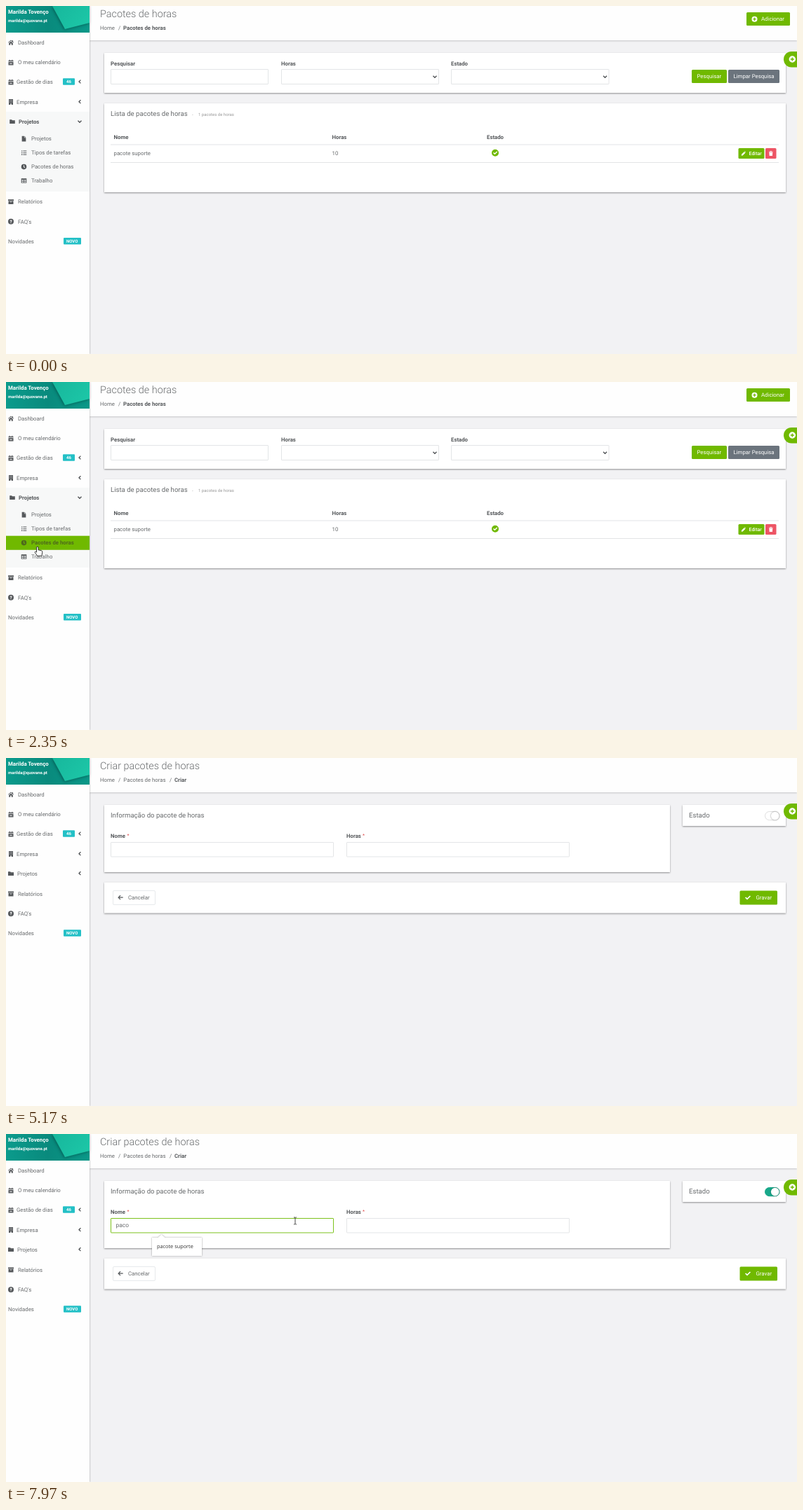
Recreate the animation shown at these times as an HTML page. Size 1127 by 497 pixels, loop 8000 ms.

```html
<!DOCTYPE html>
<html lang="pt">
<head>
<meta charset="utf-8">
<title>Pacotes de horas</title>
<style>
html, body { margin: 0; width: 100%; height: 100%; overflow: hidden; background: #f2f2f4; }
svg { display: block; width: 1127px; height: 497px; }
text { font-family: Roboto, sans-serif; text-rendering: geometricPrecision; white-space: pre; }
.b { font-weight: 700; }
.l { font-weight: 300; }
.m { font-weight: 500; }
.seg { font-family: "Open Sans", sans-serif; }
.card { fill: #fff; filter: drop-shadow(0 1px 1px rgba(0,0,0,.42)); }
.field { fill: #fff; stroke: #e3e5e7; stroke-width: 1; }
.field.focus { stroke: #7cc21c; }
.row .bg { fill: none; }
.row.on .bg { fill: #70b900; }
.row.on text { font-weight: 700; fill: #4f6a1c; }
.row.on .ico { fill: #4f6a1c; }
.row.on .line { stroke: #4f6a1c; }
.line { fill: none; stroke: #4c4f52; stroke-width: 1.3; }
</style>
</head>
<body>
<svg id="stage" viewBox="0 0 1127 497" xmlns="http://www.w3.org/2000/svg"></svg>
<script>
const GREEN = '#70b900', GREY = '#676a6c', DARK = '#55585b', TEAL = '#23c0c6';
const DISC = 'M4 0a4 4 0 1 0 0 8a4 4 0 1 0 0-8z';
const TICK = 'M1.6 4.2l.8-.8 1.1 1.1 2.3-2.3.8.8-3.1 3.1z';

// Icons live in an 8 by 8 box.
const ICONS = {
  home: 'M0 4L4 .4 5.9 2.1V.9H7v2.2l1 .9-.6.6L4 1.6.6 4.6zM1.2 4.9L4 2.4l2.8 2.5v2.8H4.8V5.4H3.2v2.3H1.2z',
  calendar: 'M.5 1.1h1.2V0h1.1v1.1h2.4V0h1.1v1.1h1.2v1.5h-7zM.5 3.2h7v4.6h-7zM2.3 5.1v.9h3.4v-.9z',
  building: 'M1 0h6v8H4.7V6.2H3.3V8H1zM2.3 1.2v1h1v-1zM4.7 1.2v1h1v-1zM2.3 3.6v1h1v-1zM4.7 3.6v1h1v-1z',
  folder: 'M0 1.2h3l1 1h4v4.9H0z',
  file: 'M1 0h3.4v2.6H7V8H1zM5 0l2 2H5z',
  list: 'M2.8.8H8v1.1H2.8zM2.8 3.5H8v1.1H2.8zM2.8 6.2H8v1.1H2.8zM.3.7h1.4v1.4H.3zM.3 3.4h1.4v1.4H.3zM.3 6.1h1.4v1.4H.3z',
  clock: DISC + 'M3.5 1.6h1v2.3l1.4 1-.6.8-1.8-1.3z',
  table: 'M0 .6h8v6.8H0zM1 2.7v1.4h2.5V2.7zM4.5 2.7v1.4H7V2.7zM1 5.1v1.3h2.5V5.1zM4.5 5.1v1.3H7V5.1z',
  archive: 'M0 .6h8v2H0zM.5 3.1h7v4.3h-7zM3 3.8v.7h2v-.7z',
  help: DISC + 'M2.6 3.1Q2.6 1.6 4 1.6 5.5 1.6 5.5 2.9 5.5 3.8 4.5 4.3V4.9H3.5V3.9Q4.5 3.4 4.5 2.9 4.5 2.5 4 2.5 3.6 2.5 3.6 3.1zM3.5 5.4h1v1h-1z',
  plus: DISC + 'M3.4 1.8v1.6H1.8v1.2h1.6v1.6h1.2V4.6h1.6V3.4H4.6V1.8z',
  done: DISC + TICK,
  check: 'M0 4.3l1.2-1.2 1.8 1.8L6.8 1.1 8 2.3 3 7.3z',
  back: 'M0 4l3.6-3.6.9.9-2 2H8v1.4H2.5l2 2-.9.9z',
  pencil: 'M0 8l.4-2.4L4.9 1.1l2 2L2.4 7.6zM5.4.6L6 0l2 2-.6.6z',
  trash: 'M.6.7h2L3 0h2l.4.7h2v1H.6zM1.1 2.2h5.8L6.5 8h-5z'
};

const text = (s, x, y, o = {}) => {
  const { size = 7.8, fill = GREY, cls = '', id = '' } = o;
  return `<text id="${id}" class="${cls}" x="${x}" y="${y + size * .355}" font-size="${size}" fill="${fill}">${s}</text>`;
};
const bold = (s, x, y, o) => text(s, x, y, { fill: DARK, cls: 'b', ...o });
const box = (x, y, x2, y2, fill, r = 1.5, extra = '') =>
  `<rect x="${x}" y="${y}" width="${x2 - x}" height="${y2 - y}" rx="${r}" fill="${fill}" ${extra}/>`;
const card = (x, y, x2, y2) => box(x, y, x2, y2, '#fff', .5, 'class="card"');
const field = (x, y, x2, y2, id = '') =>
  box(x + .5, y + .5, x2 - .5, y2 - .5, '#fff', .5, `class="field" id="${id}"`);
const icon = (name, cx, cy, size = 8, fill = DARK) =>
  `<path class="ico" fill="${fill}" fill-rule="evenodd" d="${ICONS[name]}" transform="translate(${cx - size / 2} ${cy - size / 2}) scale(${size / 8})"/>`;
const line = (d, extra = '') => `<path class="line" d="${d}" ${extra}/>`;
const rule = y => `<path d="M149 ${y}H1101" stroke="#e2e4e6"/>`;
const left = y => line(`M106.4 ${y - 2.4}l-2.4 2.4 2.4 2.4`);
const down = (x, y) => line(`M${x - 2.5} ${y - 1.2}l2.5 2.5 2.5-2.5`);
const badge = (s, x, x2, y, tx) => box(x, y - 4.7, x2, y + 4.7, TEAL, 1) + bold(s, tx, y, { size: 6, fill: '#fff' });
const item = (name, s, x, y) => icon(name, 7, y, 8) + text(s, x, y);
const button = (x, y, x2, y2, fill, s, tx, id = '') =>
  box(x, y, x2, y2, fill, 1.5, `id="${id}"`) + text(s, tx, (y + y2) / 2, { fill: '#fff' });
const tail = (a, b, c) =>
  item('archive', 'Relatórios', 17, a) + item('help', "FAQ's", 17, b) +
  text('Novidades', 3, c) + badge('NOVO', 82, 107, c - .5, 86);

const rows = [
  { y: 151, y2: 179.5, c: 165, s: 'Projetos', ic: 'folder', x: 18, ix: 9, head: true },
  ...[['file', 'Projetos'], ['list', 'Tipos de tarefas'], ['clock', 'Pacotes de horas'], ['table', 'Trabalho']]
    .map(([ic, s], i) => ({ y: 179.5 + 20.1 * i, y2: 199.6 + 20.1 * i, c: 189.6 + 20 * i, s, ic, x: 36, ix: 25.5 }))
];
const row = r => `<g class="row">${box(0, r.y, 119, r.y2, '', 0, 'class="bg"')}
  ${icon(r.ic, r.ix, r.c, 7.6)}${r.head ? bold(r.s, r.x, r.c) + down(105, r.c) : text(r.s, r.x, r.c)}</g>`;

const sidebar = `
  ${box(0, 0, 119, 497, '#fefefe', 0, 'style="filter:drop-shadow(0 0 1.2px rgba(0,0,0,.4))"')}
  <linearGradient id="deep"><stop stop-color="#0b9b8c"/><stop offset=".5" stop-color="#098a7d"/><stop offset="1" stop-color="#0a9888"/></linearGradient>
  <linearGradient id="mint" x2="1" y2=".5"><stop stop-color="#17b79c"/><stop offset="1" stop-color="#1cc5a6"/></linearGradient>
  ${box(0, 0, 119, 38, 'url(#deep)', 0)}
  <path d="M66 0L84 33 119 24V0z" fill="url(#mint)" style="filter:drop-shadow(-1px 1px 2px rgba(0,50,45,.5))"/>
  ${box(119, 0, 120, 40, '#dcdfe0', 0)}
  ${bold('Marilda Tovenço', 3, 8, { fill: '#fff' })}
  ${bold('marilda@quovane.pt', 3, 20.5, { fill: '#fff', size: 6 })}
  ${item('home', 'Dashboard', 17, 52)}
  ${item('calendar', 'O meu calendário', 17, 80.7)}
  ${item('calendar', 'Gestão de dias', 15, 108.7)}${badge('46', 81, 98, 108, 86)}${left(108)}
  ${item('building', 'Empresa', 15, 137)}${left(136.7)}`;

const listPage = `
  ${box(0, 151, 119, 265, '#f7f8f8', 0)}
  ${rows.map(row).join('')}
  ${tail(279.7, 307.8, 336.3)}
  ${text('Pacotes de horas', 134, 11, { size: 14.4, cls: 'l' })}
  ${text('Home', 134, 31)}${text('/', 160, 31)}${bold('Pacotes de horas', 167, 31)}
  ${button(1055, 9, 1117, 28, GREEN, 'Adicionar', 1076, 'add')}${icon('plus', 1066.5, 18.7, 8, '#fff')}
  ${card(140, 67, 1111, 124)}
  ${bold('Pesquisar', 149, 82)}${bold('Horas', 392, 82)}${bold('Estado', 634, 82)}
  ${field(149, 90, 374, 112)}${field(392, 90, 617, 112)}${field(634, 90, 859.5, 112)}
  ${down(611, 101)}${down(853.5, 101)}
  ${button(977, 91, 1027, 110, GREEN, 'Pesquisar', 984.5)}
  ${button(1029, 91, 1102, 110, '#6b747d', 'Limpar Pesquisa', 1036.5)}
  ${card(140, 139, 1111, 266)}
  ${text('Lista de pacotes de horas', 149, 153.7, { size: 9.6 })}
  ${text('-', 265, 154.7, { size: 6, fill: '#999' })}${text('1 pacotes de horas', 274, 154.9, { size: 6, fill: '#999' })}
  ${bold('Nome', 153.5, 187)}${bold('Horas', 464.5, 187)}${bold('Estado', 685, 187)}
  ${rule(198)}${rule(223.5)}
  ${text('pacote suporte', 153.5, 210.3)}${text('10', 464.5, 210.3)}
  ${icon('done', 697, 209.7, 10, GREEN)}
  ${box(1043.5, 203, 1080.5, 218, GREEN)}${icon('pencil', 1051, 210.5, 6.5, '#fff')}
  ${text('Editar', 1058.5, 210.6, { size: 7, fill: '#fff', cls: 'm' })}
  ${box(1082, 203, 1097.5, 218, '#ed5565')}${icon('trash', 1089.8, 210.5, 6.8, '#fff')}`;

const formPage = `
  ${icon('folder', 7, 165)}${text('Projetos', 16, 165.3)}${left(164.7)}
  ${tail(194, 222.2, 250.5)}
  ${text('Criar pacotes de horas', 134, 11, { size: 14.4, cls: 'l' })}
  ${text('Home', 134, 31)}${text('/', 160, 31)}${text('Pacotes de horas', 167.3, 31)}${text('/', 233, 31)}${bold('Criar', 240, 31)}
  ${card(140, 67, 946, 163)}
  ${text('Informação do pacote de horas', 149, 82, { size: 9.6 })}
  ${bold('Nome', 149, 111)}${bold('Horas', 485, 111)}
  ${text('*', 172.5, 110.5, { fill: '#e05050', size: 7 })}${text('*', 508, 110.5, { fill: '#e05050', size: 7 })}
  ${field(149, 120, 467, 141.5, 'nameField')}${field(485, 120, 803, 141.5)}
  ${text('', 156.5, 130, { size: 8.4, id: 'typed' })}
  <rect id="caret" y="125" width="1" height="11" fill="#444"/>
  ${card(964, 67, 1111, 97)}
  ${text('Estado', 973, 82, { size: 9.6 })}
  ${box(1081.5, 76.5, 1102, 88.7, '#fff', 6.1, 'id="track" stroke="#dfdfdf"')}
  <circle cx="1095.7" cy="82.6" r="5.8" fill="#fff" style="filter:drop-shadow(0 .6px .8px rgba(0,0,0,.45))"/>
  ${card(140, 177.5, 1111, 221.5)}
  ${box(152.5, 189.5, 212.5, 209.5, '#fff', 1.5, 'stroke="#e7eaec"')}
  ${icon('back', 163, 199.2, 7.4)}${text('Cancelar', 174, 199.5)}
  ${button(1045.5, 189.5, 1099, 209.5, GREEN, 'Gravar', 1068.5)}${icon('check', 1057, 199.3, 8, '#fff')}
  <g id="menu"></g>`;

const $ = id => document.getElementById(id);
$('stage').innerHTML = `
  ${box(119, 0, 1127, 497, '#f2f2f4', 0)}
  ${box(119, 0, 1127, 49, '#fefefe', 0, 'style="filter:drop-shadow(0 1px 1px rgba(0,0,0,.18))"')}
  ${sidebar}
  <g id="list">${listPage}</g><g id="form">${formPage}</g>
  ${box(1108, 65, 1145, 87.5, GREEN, 11.2)}${icon('plus', 1120.3, 76, 9.5, '#fff')}
  <path id="cursor" stroke-linejoin="round"/>`;
const rowNodes = document.querySelectorAll('.row');

const CURSORS = {
  arrow: 'M0 0V9.8L2.2 7.8 3.8 11.4 5.4 10.7 3.8 7.2H6.9z',
  hand: 'M-1.2.8Q0-.5 1.2.8V4.8L5.6 5.7Q7.2 6.2 7 8.2L6.2 13.4H0L-3.6 8.4Q-3.6 7 -2.3 7.2L-1.2 8.2z',
  beam: 'M-2-5H-.6L0-4.4 .6-5H2M0-4.4V4.4M-2 5H-.6L0 4.4 .6 5H2'
};

// Pointer runs: each is a list of [ms, x, y]; it is hidden between runs.
const RUNS = [
  [[140, 783, 401], [450, 420, 316], [680, 90, 196], [830, 4, 167], [1320, 5, 169], [1460, 5, 172], [1850, 12, 218.5],
   [2180, 36, 235], [2270, 38, 235], [2420, 51, 235], [2585, 51, 235], [2590, 73, 226], [2830, 76, 229],
   [2980, 232, 250.5], [3240, 1024, 274], [3300, 1024, 274]],
  [[3920, 1102, 3], [4400, 1081.5, 21], [4940, 1081.5, 21]],
  [[5250, 1030, 60], [5640, 412, 124], [8000, 412, 124]]
];
const STEP = 78;

function pointer(t) {
  const run = RUNS.find(r => t >= r[0][0] && t < r[r.length - 1][0]);
  if (!run) return null;
  const i = run.findIndex(k => k[0] > t), [t0, x0, y0] = run[i - 1], [t1, x1, y1] = run[i];
  const p = Math.floor((t - t0) / STEP) * STEP / (t1 - t0);
  return { x: x0 + (x1 - x0) * p, y: y0 + (y1 - y0) * p };
}

const KEYS = [[6870, 'p'], [7030, 'pa'], [7270, 'pac'], [7420, 'paco']];
const NAMES = ['programação', 'Véspera de Natal', 'Clientes', 'Formação', 'Departamento Financeiro', 'pacote suporte'];
const inside = (p, x, y, x2, y2) => p && p.x >= x && p.x < x2 && p.y >= y && p.y < y2;
const fade = (t, from, len) => Math.min(1, Math.max(0, (t - from) / len));
const mix = (a, b, k) => `rgb(${a.map((v, i) => Math.round(v + (b[i] - v) * k))})`;

let shown = null;
function drawMenu(query) {
  if (query === shown) return;
  shown = query;
  if (query === null) return $('menu').innerHTML = '';
  const hits = NAMES.filter(n => n.startsWith(query));
  const right = hits.length > 2 ? 315 : 279, bottom = 152.5 + 21.5 * hits.length;
  $('menu').innerHTML =
    `<path d="M208 148H216.5L221.5 143.5 226.5 148H${right}V${bottom}H208z" fill="#fff" style="filter:drop-shadow(0 .5px 1px rgba(0,0,0,.4))"/>` +
    hits.map((n, i) => text(n, 215, 160.6 + 21.5 * i, { size: 7.35, fill: '#333', cls: 'seg' })).join('');
}

function draw(t) {
  const p = pointer(t), onForm = t >= 4940;
  $('list').style.display = onForm ? 'none' : '';
  $('form').style.display = onForm ? '' : 'none';

  const over = rows.findIndex(r => !onForm && inside(p, 0, r.y, 119, r.y2));
  rowNodes.forEach((n, i) => n.classList.toggle('on', i === over));
  $('add').setAttribute('fill', mix([112, 185, 0], [173, 255, 47], fade(t, 4070, 230)));
  $('track').setAttribute('fill', mix([255, 255, 255], [24, 168, 138], fade(t, 5180, 450)));
  $('track').setAttribute('stroke', mix([223, 223, 223], [24, 168, 138], fade(t, 5180, 450)));

  const key = KEYS.filter(k => t >= k[0]).pop(), word = key ? key[1] : '';
  $('nameField').classList.toggle('focus', t >= 5640);
  $('typed').textContent = word;
  const caretOn = t >= 5640 && t < 6190 || t >= 6720 && t < 7970;
  $('caret').setAttribute('x', word ? 156.5 + $('typed').getComputedTextLength() - .2 : 156.5);
  $('caret').style.display = caretOn ? '' : 'none';
  drawMenu(t >= 5870 ? word : null);

  const c = $('cursor');
  c.style.display = p ? '' : 'none';
  if (!p) return;
  const onAdd = !onForm && t < 4790 && inside(p, 1055, 9, 1117, 28);
  const onField = onForm && (inside(p, 149, 120, 467, 142) || inside(p, 485, 120, 803, 142));
  const shape = onField ? 'beam' : onAdd || over >= 0 ? 'hand' : 'arrow';
  c.setAttribute('d', CURSORS[shape]);
  c.setAttribute('transform', `translate(${p.x} ${p.y})`);
  c.setAttribute('fill', shape === 'beam' ? 'none' : '#fff');
  c.setAttribute('stroke', shape === 'beam' ? '#333' : '#222');
  c.setAttribute('stroke-width', .9);
}

const start = performance.now();
function tick() {
  draw((performance.now() - start) % 8000);
  requestAnimationFrame(tick);
}
tick();
</script>
</body>
</html>
```
